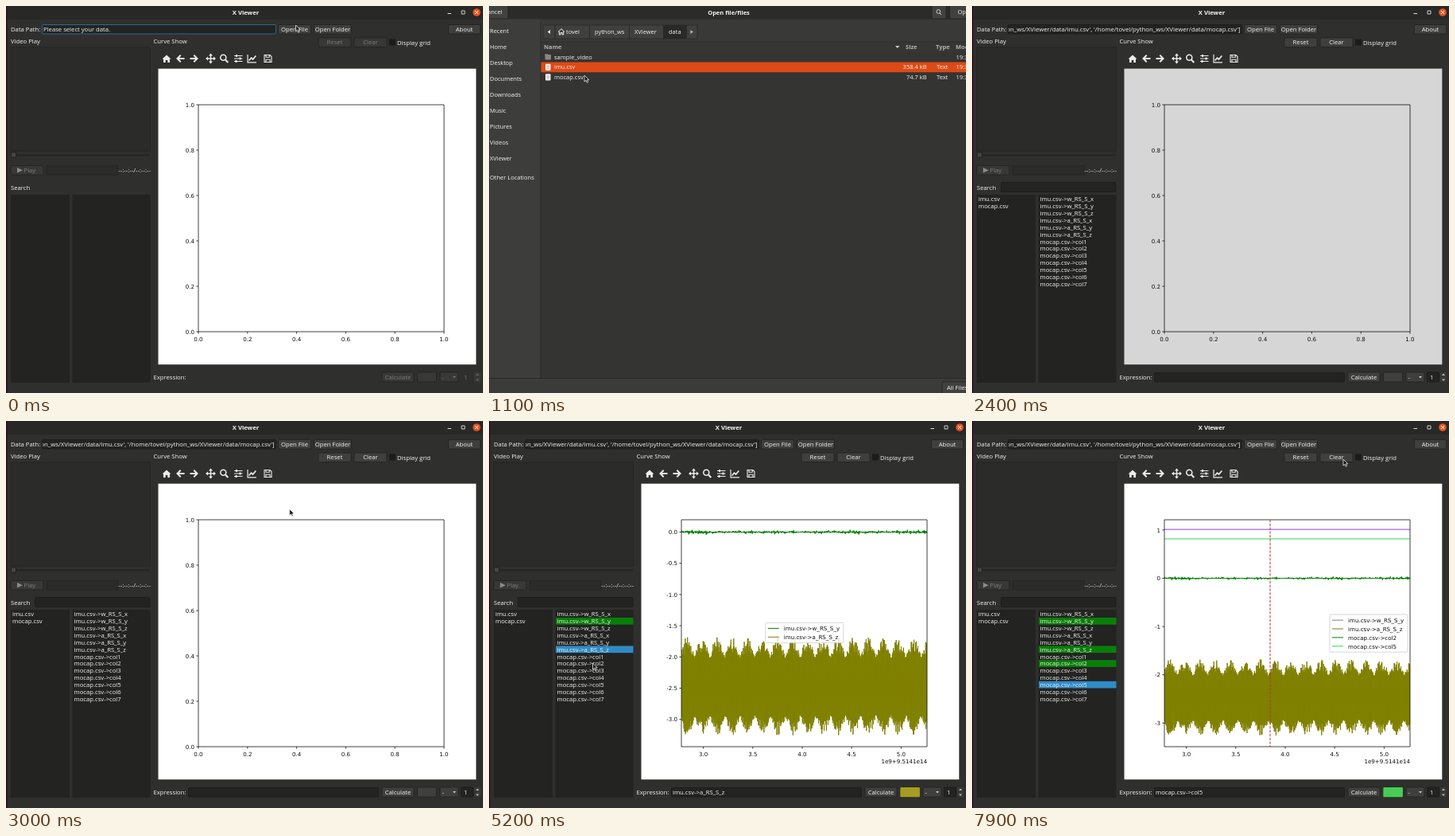
Write an HTML page that moves like this. It is 600 by 486 pixels and loops after 8 s.

```html
<!DOCTYPE html>
<html lang="en">
<head>
<meta charset="utf-8">
<title>X Viewer</title>
<style>
html, body { margin: 0; width: 100%; height: 100%; overflow: hidden; background: #2e2e2d; }
svg { display: block; width: 600px; height: 486px; font: 7.7px "Open Sans", "Noto Sans", sans-serif; fill: #f4f4f2; }
text { white-space: pre; }
.b { font-weight: 700; }
.off { fill: #7d7d7b; }
.mid { text-anchor: middle; }
.end { text-anchor: end; }
.path { font-size: 7.8px; }
.dialog { font-size: 7.5px; }
.plot { font: 7.1px "DejaVu Sans", sans-serif; fill: #111; }
</style>
</head>
<body>
<svg id="stage" viewBox="0 0 600 486" xmlns="http://www.w3.org/2000/svg"></svg>
<script>
const LOOP = 8000, STEP = 100;
const AX = { l: 242, r: 551, t: 124, b: 409 };
const PAPER = [191.5, 78.7, 399.8, 371.5];
const GREEN = '#008000', OLIVE = '#808000', LIME = '#2fdc4e', PURPLE = '#8a3ff0';

// markup helpers; text is placed by its vertical middle
const rect = (x, y, w, h, fill, more = '') =>
  `<rect x="${x}" y="${y}" width="${w}" height="${h}" fill="${fill}" ${more}/>`;
const text = (x, y, s, cls = '', more = '') =>
  `<text x="${x}" y="${y + 2.7}" class="${cls}" ${more}>${s}</text>`;
const line = (d, color, width = 1, more = '') =>
  `<path d="${d}" fill="none" stroke="${color}" stroke-width="${width}" ${more}/>`;
const shape = (d, fill) => `<path d="${d}" fill="${fill}"/>`;
const group = (id, body, cls = '') => `<g id="${id}" class="${cls}">${body}</g>`;

function button(x, y, w, h, label, on = true) {
  return rect(x + .5, y + .5, w - 1, h - 1, on ? '#3f3f3e' : '#383837', 'rx="1.5" stroke="#1f1f1e" stroke-width=".7"') +
    text(x + w / 2, y + h / 2, label, on ? 'mid' : 'mid off');
}
const field = (x, y, w, h, stroke = '#1b1b1a') =>
  rect(x + .5, y + .5, w - 1, h - 1, '#232322', `rx="1" stroke="${stroke}" stroke-width=".8"`);

// ---------- main window ----------
function toolbar() {
  const c = '#ebebe9';
  return shape('M196.5 66.5L202 61.5 207.5 66.5H206V71H203.3V68H200.7V71H198V66.5Z', c) +
    line('M224.5 66H216M219.7 61.8L215.5 66 219.7 70.2', c, 2) +
    line('M231.5 66H240M236.3 61.8L240.5 66 236.3 70.2', c, 2) +
    line('M252 66H263M257.5 60.5V71.5', c, 1.4) +
    shape('M257.5 59.5L260 62.4H255ZM257.5 72.5L260 69.6H255ZM251 66L254 63.5V68.5ZM264 66L261 63.5V68.5Z', c) +
    `<circle cx="273.3" cy="64.8" r="3.5" fill="none" stroke="${c}" stroke-width="1.6"/>` +
    line('M276 67.5L279.3 71', c, 2) +
    line('M287 62.5H297.5M287 66H297.5M287 69.5H297.5', c, 1) +
    line('M290 61V64M294.5 64.5V67.5M289.5 68V71', c, 2) +
    line('M304 61V70.8H315', c, 1.2) +
    line('M305.5 68.5L308.5 65.2 310.5 67 314.3 62.5', c, 1.7) +
    line('M325 61.5H332L334 63.5V70.5H325ZM327 61.5V64.3H331.3V61.5M327 70.3V67.2H332V70.3', c, 1.1);
}

function mainWindow(ready) {
  const path = "['/home/tovel/python_ws/XViewer/data/imu.csv', '/home/tovel/python_ws/XViewer/data/mocap.csv']";
  const dim = ready ? '' : 'off';
  return rect(0, 0, 600, 486, '#2f2f2e') + rect(0, 0, 600, 17, '#282827') + rect(0, 0, 1.5, 486, '#2c1020') +
    text(301.5, 8, 'X Viewer', 'b mid') +
    line('M555.5 9.5H560', '#ddd', 1) + line('M573 6H577V10H573Z', '#ddd', .9) +
    '<circle cx="592" cy="8" r="4.8" fill="#e95420"/>' + line('M590 6L594 10M594 6L590 10', '#fff', 1) +
    text(6, 29, 'Data Path:') +
    field(45, 23, 295, 12.5, ready ? '#1b1b1a' : '#2f78ad') +
    (ready ? text(337.5, 29, path, 'end path', 'clip-path="url(#pathClip)"') : text(47, 29, 'Please select your data.')) +
    button(342, 23, 42, 12.5, 'Open File') + button(387, 23, 48, 12.5, 'Open Folder') + button(556, 23, 41, 12.5, 'About') +
    text(6, 44, 'Video Play') + text(185.5, 44, 'Curve Show') +
    button(392.5, 39.5, 42, 12.5, 'Reset', ready) + button(437.5, 39.5, 42, 12.5, 'Clear', ready) +
    rect(482, 41.5, 8, 8, '#1c1c1b') + text(492, 46, 'Display grid') +
    rect(6, 52, 175.5, 130, '#2b2b2a', 'stroke="#252524"') +
    rect(6, 186, 175, 2.5, '#262625') + rect(6.5, 184, 6, 6, '#464645', 'stroke="#222"') +
    button(5.5, 200, 42, 12.5, '', false) + shape('M14 203L21 206.2 14 209.5Z', '#8a8a88') + text(22.5, 206, 'Play', 'off') +
    rect(51, 200.5, 90, 11.5, '#2b2b2a', 'stroke="#252524" stroke-width=".8"') +
    text(182, 206, '--:--:--/--:--:--', 'end') +
    text(6, 228, 'Search') + (ready ? field(36, 221, 145.5, 13) : '') +
    rect(6, 237, 74, 236, '#232322') + rect(83.5, 237, 98, 236, '#232322') +
    toolbar() + rect(...PAPER, '#fff') +
    text(185.5, 466, 'Expression:') + (ready ? field(229, 460, 240, 12.5) : '') +
    button(472.5, 459.5, 41, 13, 'Calculate', ready) +
    button(517, 459.5, 25, 13, '', ready) + button(545.5, 459.5, 24, 13, '', ready) +
    text(548.5, 466, '-', dim) + shape('M562 465H566L564 467.5Z', ready ? '#ccc' : '#777') +
    (ready ? field(572, 459.5, 16, 13) : '') + text(576, 466, '1', dim) +
    rect(589, 460, 8, 12, '#383837') + shape('M591 464H595L593 461.5ZM591 468.5H595L593 471Z', ready ? '#bbb' : '#666');
}

// ---------- list ----------
const COLS = [...['w', 'a'].flatMap(k => ['x', 'y', 'z'].map(a => `imu.csv->${k}_RS_S_${a}`)),
  ...Array.from({ length: 7 }, (_, i) => `mocap.csv->col${i + 1}`)];
const rowY = i => 242.7 + i * 8.87;

function lists(picks) {
  const marks = picks.map((p, i) =>
    rect(84, rowY(p) - 4.6, 97.5, 8.7, i === picks.length - 1 ? '#308cc6' : '#087f08')).join('');
  return marks + COLS.map((s, i) => text(85.5, rowY(i), s)).join('') +
    text(8, rowY(0), 'imu.csv') + text(8, rowY(1), 'mocap.csv');
}

// ---------- signals ----------
let seed = 20;
function rnd() {
  seed = (seed + 0x6D2B79F5) | 0;
  let t = Math.imul(seed ^ seed >>> 15, 1 | seed);
  t = t + Math.imul(t ^ t >>> 7, 61 | t) ^ t;
  return ((t ^ t >>> 14) >>> 0) / 4294967296;
}

// tall peaks of the gyro signal: x, value in thousandths
const PEAKS = [242, 29, 249, 23, 255, 35, 264, 29, 272, 22, 290, 20, 307, 19, 314, 28, 330, 27, 346, 20, 358, 24,
  363, 24, 383, 30, 398, 20, 412, 22, 427, 31.5, 434, 27, 445, 22, 454, 36.5, 462, 22, 482, 20, 490, 25, 500, 24,
  513, 29, 526, 36, 540, 36, 547, 32, 251, -37, 257, -28, 263, -32, 273, -41, 281, -26, 296, -21, 323, -30,
  331, -27, 345, -26, 359, -34, 372, -26, 383, -21, 410, -27, 418, -30, 448, -32, 465, -39, 473, -27,
  488, -26, 516, -34, 530, -31, 537, -24, 548, -27];

function gyro() {
  const pts = [];
  const needle = (x, v) => pts.push([x, 0], [x + .2, v], [x + .4, 0]);
  for (let x = AX.l; x <= AX.r; x += .7) {
    const reach = () => .0032 + .008 * rnd() ** 2;
    pts.push([x, reach()], [x + .35, -reach()]);
  }
  for (let i = 0; i < PEAKS.length; i += 2) {
    const x = PEAKS[i], v = PEAKS[i + 1] / 1000;
    needle(x, v);
    // each tall peak rings: shorter needles stand close by
    for (let k = 0; k < 5; k++)
      needle(Math.min(AX.r - 1, Math.max(AX.l, x + 12 * (rnd() - .5))), v * (.3 + .4 * rnd()));
  }
  return pts.sort((a, b) => a[0] - b[0]);
}

function accel() {
  const pts = [];
  for (let x = AX.l; x <= AX.r; x += .7) {
    const swell = .1 + .9 * Math.abs(Math.sin((x - 242) * Math.PI / 19 + .4));
    const reach = () => swell * (.3 + .7 * rnd());
    pts.push([x, -2.04 + .36 * reach()], [x + .35, -2.91 - .35 * reach()]);
  }
  return pts;
}

const flat = v => [[AX.l, v], [AX.r, v]];
const SERIES = {
  1: { data: gyro(), color: GREEN, key: GREEN, swatch: '#229a22' },
  5: { data: accel(), color: OLIVE, key: OLIVE, swatch: '#a59c22' },
  7: { data: flat(1.012), color: PURPLE, key: GREEN, swatch: PURPLE },
  10: { data: flat(.817), color: LIME, key: LIME, swatch: '#48cb55' }
};

// ---------- plot ----------
const range = (a, b, s) => Array.from({ length: Math.round((b - a) / s) + 1 }, (_, i) => a + i * s);
const VIEWS = {
  empty: { zero: 409, unit: 285, ticks: range(0, 1, .2), digits: 1 },
  gyro: { zero: 258.5, unit: 3340, ticks: range(-.04, .04, .01), digits: 2 },
  pair: { zero: 139.5, unit: 78.4, ticks: range(-3, 0, .5), digits: 1 },
  all: { zero: 197.5, unit: 60.6, ticks: range(-3, 1, 1), digits: 0 }
};

function label(v, digits) {
  const s = Math.abs(v).toFixed(digits);
  return (v < 0 && +s ? '-' : '') + s;
}

function legend(picks, x, y, keys) {
  const h = 3.6 + 10.9 * picks.length;
  return rect(x, y, 98, h, '#fff', 'fill-opacity=".85" rx="1.5" stroke="#ccc" stroke-width=".8"') +
    picks.map((p, i) => {
      const cy = y + 7.1 + i * 10.9;
      return line(`M${x + 3} ${cy}h14`, keys && keys[i] || SERIES[p].key, 1) + text(x + 23, cy, COLS[p]);
    }).join('');
}

function plot({ view, picks, key, keys }) {
  const { zero, unit, ticks, digits } = VIEWS[view];
  const py = v => zero - v * unit;
  const xs = picks.length ? range(3, 5, .5).map(v => [269.6 + (v - 3) * 124.4, v]) : range(0, 1, .2).map(v => [242 + v * 309, v]);
  let out = picks.map(p => line('M' + SERIES[p].data.map(([x, v]) => `${x.toFixed(2)} ${py(v).toFixed(2)}`).join('L'),
    SERIES[p].color, 1, 'stroke-linejoin="round" clip-path="url(#axClip)"')).join('');
  out += line(`M${AX.l} ${AX.t}H${AX.r}V${AX.b}H${AX.l}Z`, '#111', .8);
  for (const v of ticks)
    out += line(`M${AX.l} ${py(v)}h-2.6`, '#111', .8) + text(237, py(v), label(v, digits), 'end');
  for (const [x, v] of xs)
    out += line(`M${x} ${AX.b}v2.6`, '#111', .8) + text(x, 418, v.toFixed(1), 'mid');
  if (picks.length) out += text(551, 427, '1e9+9.5141e14', 'end') + legend(picks, ...key, keys);
  return `<g class="plot">${out}</g>`;
}

function scene(s, i) {
  let out = mainWindow(s.ready) + plot(s);
  if (s.ready) out += lists(s.picks);
  if (s.picks.length) {
    const last = s.picks[s.picks.length - 1];
    out += text(231, 466, COLS[last]) + rect(517.3, 460, 24.6, 12.3, SERIES[last].swatch, 'rx="1"');
  }
  return group('scene' + i, out);
}

// ---------- file dialog ----------
function fileIcon(y) {
  return rect(71, y - 4, 6.5, 8.2, '#f4f2ee', 'rx=".8"') + line(`M72.5 ${y - 1.5}h3.5M72.5 ${y + .2}h3.5M72.5 ${y + 1.9}h2.5`, '#a9a5a0', .7);
}

function dialog() {
  const places = ['Recent', 'Home', 'Desktop', 'Documents', 'Downloads', 'Music', 'Pictures', 'Videos', 'XViewer'];
  const crumb = (x, w, s, tx, on) => rect(x, 24, w, 17, on ? '#292928' : '#40403e', 'stroke="#282827" stroke-width=".8"') + text(tx, 32.3, s);
  const row = (y, name, size, kind) => text(82, y, name) + text(550.5, y, size, 'end') + text(563, y, kind) + text(587.5, y, '19:34');
  const border = 'rx="2" stroke="#222221" stroke-width=".8"';
  return rect(0, 0, 600, 486, '#343432') + rect(0, 0, 600, 16.5, '#2b2b2a') +
    rect(-8, -3, 32, 19, '#41413f', border) + text(16.5, 7.5, 'Cancel', 'end') +
    text(301.5, 7.8, 'Open file/files', 'b mid') +
    rect(557, -2, 18, 18, '#41413f', border) +
    '<circle cx="565.3" cy="7" r="2.4" fill="none" stroke="#ddd" stroke-width=".9"/>' + line('M567 9L569 11', '#ddd', 1) +
    rect(579.5, -2, 40, 18, '#41413f', border) + text(589.5, 7.5, 'Open') +
    rect(0, 16.5, 65, 451, '#3d3d3b') + line('M65 20V467.5', '#282827', .8) +
    places.map((s, i) => text(1, 31.6 + i * 19.9, s)).join('') + text(1, 215, 'Other Locations') +
    rect(65.4, 17, 535, 28, '#393937') +
    crumb(68, 15, '', 0) + shape('M77 30V35L73.7 32.5Z', '#eee') +
    crumb(83, 43.5, 'tovel', 97) + line('M87 32.5L91 28.7 95 32.5M88.3 32V36H90V33.5H92V36H93.7V32', '#eee', 1) +
    crumb(126.5, 50, 'python_ws', 133) + crumb(176.5, 43, 'XViewer', 183) + crumb(219.5, 29, 'data', 226, true) +
    crumb(248.5, 13.5, '', 0) + shape('M253.5 30V35L256.8 32.5Z', '#bbb') +
    rect(65.4, 45, 535, 12.5, '#363634') + line('M65.4 45H600', '#2c2c2a', .8) +
    `<g fill="#b3b3b0" class="b">${text(69, 51.3, 'Name') + text(524, 51.3, 'Size') + text(562, 51.3, 'Type') + text(587, 51.3, 'Modified')}</g>` +
    shape('M511 50H516.5L513.7 53Z', '#ccc') +
    rect(65.4, 70.5, 535, 12.7, '#dd4a16') + '<rect id="second" x="65.4" y="83" width="535" height="12.8" fill="#dd4a16"/>' +
    rect(70.5, 61, 7.5, 6.5, '#8a8580', 'rx="1"') + rect(70.5, 60.3, 3.5, 2, '#8a8580') +
    row(64, 'sample_video', '', '') + row(76.7, 'imu.csv', '358.4 kB', 'Text') + row(89.3, 'mocap.csv', '74.7 kB', 'Text') +
    fileIcon(76.7) + fileIcon(89.3) +
    rect(0, 467.5, 600, 19, '#3b3b39') + line('M0 467.5H600', '#282827', .8) +
    rect(570, 472, 40, 18, '#41413f', border) + text(576, 479.5, 'All Files');
}

// ---------- timeline ----------
const SCENES = [
  { at: 0, ready: false, view: 'empty', picks: [] },
  { at: 2000, ready: true, view: 'empty', picks: [] },
  { at: 3700, ready: true, view: 'gyro', picks: [1], key: [244.5, 126] },
  { at: 4900, ready: true, view: 'pair', picks: [1, 5], key: [347.8, 253.3] },
  { at: 5500, ready: true, view: 'all', picks: [1, 5, 7], key: [450, 248.5] },
  { at: 6500, ready: true, view: 'all', picks: [1, 5, 7, 10], key: [450, 243], keys: ['#808080'] }
];

// time, x, y of the pointer tip
const POINTER = [[0, 364.5, 24], [700, 364.5, 25], [1100, 120, 87], [1300, 112, 87], [1700, 595.5, 2.5], [2000, 605, 0],
  [2700, 605, 0], [2900, 515, 44], [3200, 40, 244], [3600, 104, 251], [3900, 104, 252], [4300, 106, 254], [4700, 112, 285],
  [5000, 116, 286], [5200, 130.5, 304], [5600, 131, 304], [6200, 132, 330], [6600, 132, 331], [6800, 250, 326],
  [7100, 375, 320], [7300, 375, 300], [7800, 467, 48], [8000, 467, 48]];
const DIM = [[0, 0], [100, 0], [200, .16], [2400, .16], [2600, 0], [8000, 0]];

function at(keys, t) {
  const i = Math.max(1, keys.findIndex(k => k[0] > t));
  const a = keys[i - 1], b = keys[i], p = (t - a[0]) / (b[0] - a[0]);
  return a.slice(1).map((v, n) => v + (b[n + 1] - v) * p);
}

const stage = document.getElementById('stage');
stage.innerHTML = `<defs><clipPath id="pathClip">${rect(46, 23, 293, 13, '#fff')}</clipPath>` +
  `<clipPath id="axClip">${rect(AX.l, AX.t, AX.r - AX.l, AX.b - AX.t, '#fff')}</clipPath></defs>` +
  SCENES.map(scene).join('') +
  group('marker', line(`M0 ${AX.t}V${AX.b}`, '#b8303c', 1, 'stroke-dasharray="3.3 1.5"')) +
  rect(...PAPER, '#000', 'id="dim"') + group('dialog', dialog(), 'dialog') +
  group('pointer', '<path d="M0 0V8L1.9 6.3 3.2 9.2 4.6 8.6 3.3 5.8H5.8Z" fill="#151515" stroke="#eee" stroke-width=".8"/>');

const $ = id => document.getElementById(id);
const show = (id, on) => $(id).setAttribute('display', on ? 'inline' : 'none');

function draw(t) {
  const current = SCENES.reduce((n, s, i) => t >= s.at ? i : n, 0);
  SCENES.forEach((_, i) => show('scene' + i, i === current));
  show('dialog', t >= 300 && t < 2000);
  show('second', t >= 1300);
  $('dim').setAttribute('opacity', at(DIM, t)[0]);
  const [x, y] = at(POINTER, t);
  $('pointer').setAttribute('transform', `translate(${x} ${y})`);
  show('marker', t >= 6800);
  $('marker').setAttribute('transform', `translate(${Math.min(x, 375)})`);
}

const start = performance.now();
let shown = -1;
function tick() {
  const t = Math.floor((performance.now() - start) % LOOP / STEP) * STEP;
  if (t !== shown) draw(shown = t);
  requestAnimationFrame(tick);
}
tick();
</script>
</body>
</html>
```
